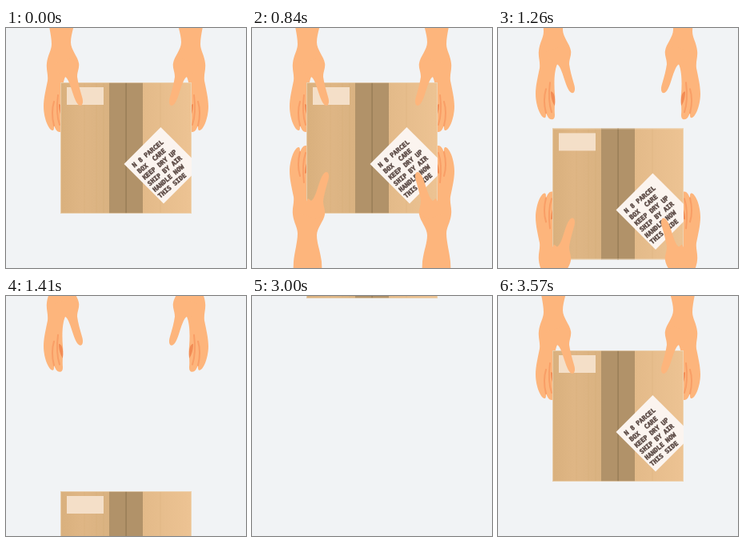
Animation, 300 px wide and 300 px high, one loop 3.6 s. Source, as an HTML page:

```html
<!DOCTYPE html>
<html lang="en">
<head>
<meta charset="utf-8">
<title>Parcel handover</title>
<style>
  html, body { margin: 0; width: 100%; height: 100%; overflow: hidden; background: #f1f3f5; }
  svg { display: block; width: 100vw; height: 100vh; }
  text {
    font: bold 8px "DejaVu Sans Mono", monospace; white-space: pre;
    fill: #5b4a45; stroke: #5b4a45; stroke-width: .5px;
  }
</style>
</head>
<body>
<svg viewBox="0 0 300 300">
  <defs>
    <linearGradient id="leftFlap">
      <stop offset="0" stop-color="#d9b07d"/>
      <stop offset=".45" stop-color="#dfb685"/>
      <stop offset="1" stop-color="#d9b281"/>
    </linearGradient>
    <linearGradient id="rightFlap">
      <stop offset="0" stop-color="#e3ba89"/>
      <stop offset="1" stop-color="#edc393"/>
    </linearGradient>
    <clipPath id="boxEdge"><rect x="68" y="68" width="164" height="164"/></clipPath>

    <g id="palm">
      <path fill="#fdb57c" d="M50 -60L52 -15C53 -4 57 10 57 20C57 28 52 34 51 44C50 52 53 58 52 66
        C50 76 47 88 47 98C47 106 49 114 51 119C53 124 56 128 58 128C60 128 60 126 60 122
        C62 127 64 130 67 130C70 130 71 128 71 124C70 115 72 108 71 98C70 86 70 70 74 61
        L88 60C87 54 92 50 91 44C90 36 81 27 81 18C81 8 85 0 87 -15L89 -60Z"/>
      <path fill="#f28c55" d="M66 95C70 96 72 101 71 113C68 109 66 103 66 95Z"/>
      <path fill="none" stroke="#f99e66" stroke-width="2" stroke-linecap="round"
        d="M60 92C57 102 58 114 60 122M65 84C63 100 64 112 67 121"/>
    </g>
    <path id="thumb" fill="#fdb57c" d="M60 45L70 64L74 61C78 63 81 74 84 83C87 92 90 97 93 97
      C96 97 97 92 95 86C92 76 90 68 89 61C89 54 92 50 91 44L80 38Z"/>

    <g id="palms"><use href="#palm"/><use href="#palm" transform="translate(300) scale(-1 1)"/></g>
    <g id="thumbs"><use href="#thumb"/><use href="#thumb" transform="translate(300) scale(-1 1)"/></g>
  </defs>

  <rect width="300" height="300" fill="#f1f3f5"/>
  <use class="giver" href="#palms"/>
  <use class="taker" href="#palms"/>

  <g id="box">
    <rect x="68" y="68" width="61.5" height="164" fill="url(#leftFlap)"/>
    <rect x="171" y="68" width="61" height="164" fill="url(#rightFlap)"/>
    <rect x="129" y="68" width="42" height="164" fill="#b19269"/>
    <rect x="149.3" y="68" width="1.6" height="164" fill="#9b7f59"/>
    <path d="M98 69V231M113 69V231M122 69V231M193 69V231" stroke="#c99f6c" stroke-opacity=".2"/>
    <rect x="68.5" y="68.5" width="163" height="163" fill="none" stroke="#f0dcc0" stroke-opacity=".65"/>
    <rect x="76" y="74" width="46" height="22" fill="#f4dfc8"/>
    <g clip-path="url(#boxEdge)">
      <g transform="translate(147.5 170) rotate(-45)">
        <rect width="65" height="70" fill="#fbf4ef"/>
        <g id="note" transform="rotate(5)"></g>
      </g>
    </g>
  </g>

  <use class="giver" href="#thumbs"/>
  <use class="taker" href="#thumbs"/>
</svg>

<script>
  const LOOP = 3600, STEP = 30;
  const all = (q) => [...document.querySelectorAll(q)];
  const box = document.getElementById('box');
  const note = document.getElementById('note');
  const givers = all('.giver'), takers = all('.taker');

  const lines = ['N 8 PARCEL', 'BOX  CARE', 'KEEP DRY UP', 'SHIP BY AIR', 'HANDLE NOW', 'THIS SIDE'];
  lines.forEach((line, i) => {
    const row = document.createElementNS('http://www.w3.org/2000/svg', 'text');
    row.setAttribute('x', 7);
    row.setAttribute('y', 12 + i * 10);
    row.textContent = line;
    note.append(row);
  });

  const clamp = (v) => Math.min(1, Math.max(0, v));
  // Accelerates from rest at `start`, covering `dist` after `span` ms.
  const speedUp = (t, start, span, dist, power) =>
    dist * Math.pow(Math.max(0, t - start) / span, power);
  // Distance still to go while slowing down to a stop at `end`.
  const toGo = (t, end, span, dist, power) =>
    dist * Math.pow(clamp((end - t) / span), power);

  const place = (els, y, flip) => els.forEach((el) =>
    el.setAttribute('transform', `translate(0 ${y})${flip ? ' scale(1 -1)' : ''}`));

  function draw(t) {
    const arriving = t >= 3000;
    const drop = -toGo(t, 3570, 570, 229, 2.2);
    const boxY = arriving ? drop : Math.min(400, speedUp(t, 800, 610, 176, 3.97));
    const giverY = arriving ? drop : -speedUp(t, 820, 950, 131, 2.75);
    const takerY = arriving ? 200 : boxY + toGo(t, 810, 540, 154, 2.2);
    place([box], boxY);
    place(givers, giverY);
    place(takers, 277 + takerY, true);
  }

  function tick(now) {
    const t = now % LOOP;
    draw(Math.floor(t / STEP) * STEP);
    requestAnimationFrame(tick);
  }
  draw(0);
  requestAnimationFrame(tick);
</script>
</body>
</html>
```
